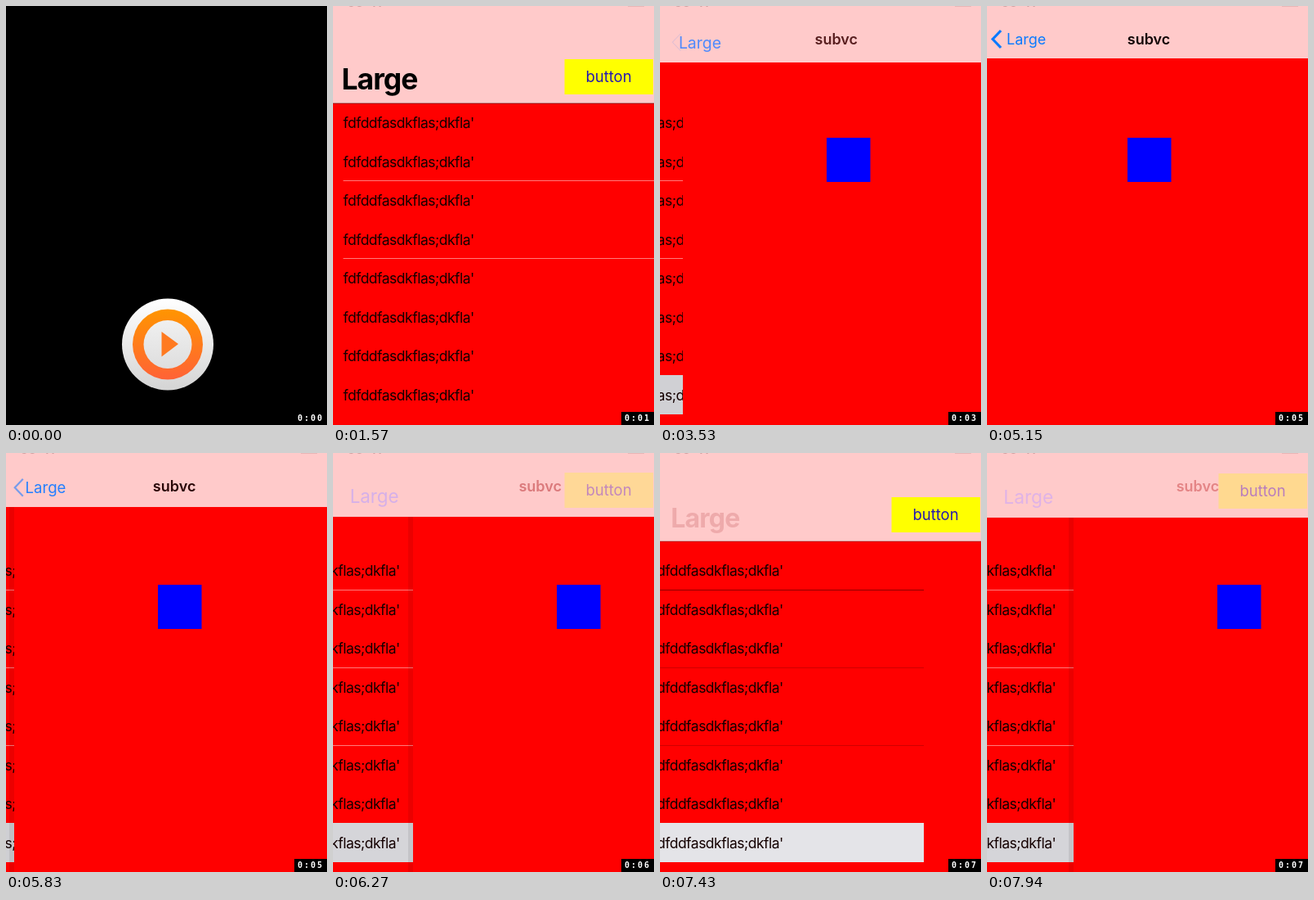
Animation of 393 by 512 pixels, one loop 8 s. Source, as an HTML page with a canvas:

```html
<!DOCTYPE html>
<html lang="en">
<head>
<meta charset="utf-8">
<title>Large title swipe</title>
<style>
html, body { margin: 0; width: 100%; height: 100%; overflow: hidden; background: #000; }
canvas { display: block; width: 393px; height: 512px; }
</style>
</head>
<body>
<canvas id="stage"></canvas>
<script>
const W = 393, H = 512, LOOP = 8000;
const ROW_H = 47.5, ROWS_TOP = 119;
const TICKS = [1060, 2080, 3060, 4160, 5150, 6200, 7200];
const PUSH_AT = 3270, SWIPE_AT = 5620;
// time, distance of the upper page from the left edge
const SWIPE = [[5620, 0], [6270, 102], [6800, 265], [7150, 338], [7430, 328], [7940, 110]];
const SANS = 'Inter, "Open Sans", sans-serif';

const canvas = document.getElementById('stage');
const ctx = canvas.getContext('2d');
const dpr = window.devicePixelRatio || 1;
canvas.width = W * dpr;
canvas.height = H * dpr;

const clamp = v => Math.max(0, Math.min(1, v));
const mix = (a, b, p) => a + (b - a) * p;
const blend = (a, b, p) => `rgb(${a.map((v, i) => Math.round(mix(v, b[i], clamp(p))))})`;

const BLUE = [10, 122, 255], LILAC = [200, 160, 255], NAVY = [37, 24, 176], VIOLET = [170, 70, 240];
const INK = [20, 6, 6], MAROON = [185, 15, 20];

function box(x, y, w, h, color) {
  ctx.fillStyle = color;
  ctx.fillRect(x, y, w, h);
}

function text(str, x, y, { size, weight = 400, color = '#000', alpha = 1, gap = 0, align = 'left', family = SANS }) {
  if (alpha <= 0) return;
  ctx.save();
  ctx.globalAlpha = clamp(alpha);
  ctx.font = `${weight} ${size}px ${family}`;
  ctx.letterSpacing = gap + 'px';
  ctx.textAlign = align;
  ctx.fillStyle = color;
  ctx.fillText(str, x, y);
  ctx.restore();
}

function smoothPath(keys, t) {
  const last = keys.length - 1;
  if (t >= keys[last][0]) return keys[last][1];
  const i = keys.findIndex((k, n) => t < keys[n + 1][0]);
  const slope = n => {
    if (n === 0) return 0;
    const [ta, a] = keys[n - 1], [tb, b] = keys[Math.min(n + 1, last)];
    return (b - a) / (tb - ta);
  };
  const [t0, a] = keys[i], [t1, b] = keys[i + 1];
  const d = t1 - t0, u = (t - t0) / d, v = 1 - u;
  return (1 + 2 * u) * v * v * a + u * v * v * d * slope(i)
    + u * u * (3 - 2 * u) * b - u * u * v * d * slope(i + 1);
}

function pageOffset(t) {
  if (t < PUSH_AT) return W;
  if (t >= SWIPE_AT) return smoothPath(SWIPE, t);
  const s = (t - PUSH_AT) * 0.0158;
  const off = W * (1 + s) * Math.exp(-s);
  return off < 0.5 ? 0 : off;
}

function drawList(t, off, p, swiping) {
  const edge = off >= W ? W : Math.max(0, Math.round(off - 4.5));
  if (!edge) return;
  ctx.save();
  ctx.beginPath();
  ctx.rect(0, 0, edge, H);
  ctx.clip();
  ctx.translate(-0.306 * (W - off) - (swiping ? 2 : 0), swiping ? 1 : 0);
  if (t >= 3260) {
    box(0, Math.floor(ROWS_TOP + 7 * ROW_H), 2 * W, 48, blend([206, 206, 210], [232, 232, 236], p));
  }
  for (let i = 0; i < 8; i++) {
    text("fdfddfasdkflas;dkfla'", 12.5, 149 + i * ROW_H, { size: 17.5, gap: -0.5, color: '#140000' });
  }
  const dark = swiping && p > 0.55;
  for (const n of swiping ? [1, 3, 5] : [2, 4]) {
    const color = dark ? `rgba(70,0,0,${n === 1 ? 0.6 : 0.25})` : 'rgba(255,190,190,.65)';
    box(12.5, Math.round(ROWS_TOP + n * ROW_H - 0.6), 2 * W, 1, color);
  }
  ctx.restore();
  if (swiping && p < 0.6) box(edge - 6, 0, 6, H, 'rgba(0,0,0,.08)');
}

function drawChevron(p) {
  ctx.save();
  ctx.globalAlpha = clamp(1 - 10 * p);
  ctx.translate(100 * p, 45 * p);
  ctx.beginPath();
  ctx.moveTo(17, 30);
  ctx.lineTo(7, 40.5);
  ctx.lineTo(17, 51);
  ctx.lineWidth = mix(3.2, 1, clamp(p * 12));
  ctx.strokeStyle = blend(BLUE, LILAC, p * 3.5);
  ctx.stroke();
  ctx.restore();
}

function drawBar(off, p, swiping) {
  // a dragged bar opens slightly less than the page moves
  const open = swiping ? p * 0.96 : p;
  const bottom = Math.round(64 + 55 * open);
  box(0, 0, W, bottom, '#ffcaca');
  box(0, bottom - 0.5, W, 1, `rgba(70,0,0,${0.6 * p * p})`);

  text('09:41', 17, 0.8, { size: 16, weight: 600, color: 'rgba(70,30,30,.25)' });
  box(361, 0, 20, 1, 'rgba(70,30,30,.12)');

  const size = 18 + 17.5 * open, x = mix(24, 10.5, open);
  const bold = clamp((p - 0.8) / 0.2);
  text('Large', x, bottom - 17, { size, color: blend(BLUE, LILAC, p * 3.5), alpha: 1.1 - 2 * p });
  text('Large', x, bottom - 17, { size, weight: 700, gap: -open, color: blend(MAROON, [0, 0, 0], bold), alpha: bold });

  text('subvc', 198 + 0.545 * off, 47, {
    size: 18, weight: 600, align: 'center', color: blend(INK, MAROON, p * 3.5), alpha: 1.1 - 2.6 * p
  });

  const shown = clamp((p - 0.1) * 1.6);
  ctx.globalAlpha = shown;
  box(283.5, bottom - 54, 108.5, 43, '#ff0');
  ctx.globalAlpha = 1;
  text('button', 337.5, bottom - 26.5, {
    size: 18.5, align: 'center', color: blend(VIOLET, NAVY, shown), alpha: shown * 2
  });

  drawChevron(p);
}

function drawApp(t) {
  const off = pageOffset(t), p = off / W, swiping = t >= SWIPE_AT;
  box(0, 0, W, H, '#f00');
  drawList(t, off, p, swiping);
  if (off < W) box(Math.round(171.5 + off), 161, 53.5, 54, '#00f');
  drawBar(off, p, swiping);
}

function disc(r, top, bottom) {
  const g = ctx.createLinearGradient(0, -r, 0, r);
  g.addColorStop(0, top);
  g.addColorStop(1, bottom);
  ctx.fillStyle = g;
  ctx.beginPath();
  ctx.arc(0, 0, r, 0, 7);
  ctx.fill();
}

function drawPlay() {
  ctx.save();
  ctx.translate(198, 413.5);
  disc(56, '#fff', '#d4d4d4');
  disc(43, '#ff9500', '#ff6236');
  disc(29.5, '#f0f0f0', '#dedede');
  ctx.fillStyle = '#ff7a20';
  ctx.beginPath();
  ctx.moveTo(-7.5, -15.5);
  ctx.lineTo(13, -0.5);
  ctx.lineTo(-7.5, 15);
  ctx.fill();
  ctx.restore();
}

function drawClock(t) {
  box(353, 496, 40, 16, '#000');
  const sec = TICKS.filter(k => t >= k).length;
  text('0:0' + sec, 357, 507, {
    size: 10, weight: 700, gap: 1.98, color: '#fff', family: '"DejaVu Sans Mono", monospace'
  });
}

function draw(t) {
  ctx.setTransform(dpr, 0, 0, dpr, 0, 0);
  box(0, 0, W, H, '#000');
  if (t < 50) drawPlay();
  if (t >= 410) {
    drawApp(t);
    // black cover that clears while the picture fades in
    box(0, 0, W, H, `rgba(0,0,0,${Math.pow(1 - clamp((t - 350) / 760), 2)})`);
  }
  drawClock(t);
}

const start = performance.now();
function tick() {
  draw((performance.now() - start) % LOOP);
  requestAnimationFrame(tick);
}
tick();
</script>
</body>
</html>
```
